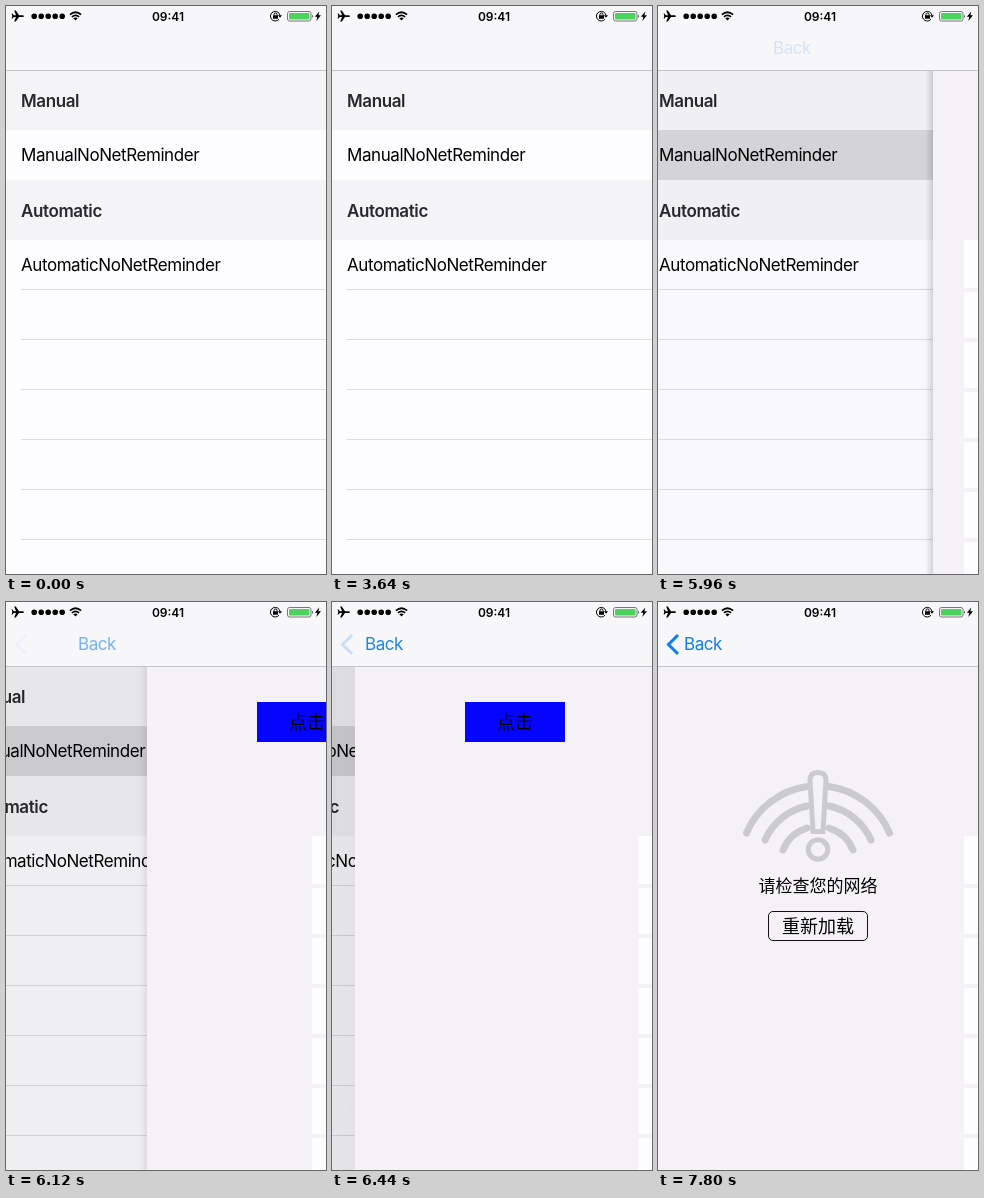
An HTML page for the animation above (8 s loop, 320 by 568 pixels).

```html
<!DOCTYPE html>
<html lang="zh-CN">
<head>
<meta charset="utf-8">
<style>
  html, body { margin: 0; width: 100%; height: 100%; overflow: hidden; }
  svg { display: block; width: 320px; height: 568px; }
  text { font: 17px Inter, sans-serif; letter-spacing: -.43px; }
  .head { font-weight: 600; fill: #29292c; letter-spacing: -.38px; }
  .time { font-size: 12px; font-weight: 600; letter-spacing: 0; }
  .cjk { font: 18px "Noto Sans CJK SC", "Noto Sans CJK", sans-serif; letter-spacing: 0; text-anchor: middle; }
  .line { fill: none; stroke-linecap: round; }
</style>
</head>
<body>
<svg viewBox="0 0 320 568">
  <defs>
    <linearGradient id="fade">
      <stop offset="0" stop-opacity="0"/>
      <stop offset="1" stop-opacity=".17"/>
    </linearGradient>
  </defs>

  <g id="list">
    <rect width="320" height="568" fill="#fdfcff"/>
    <path d="M0 64h320v60H0zM0 174h320v60H0z" fill="#f4f3f6"/>
    <rect id="pressed" y="124" width="320" height="50" fill="#d7d6d9"/>
    <path d="M15 283.5H320M15 333.5H320M15 383.5H320M15 433.5H320M15 483.5H320M15 533.5H320" stroke="#dddce0"/>
    <text class="head" x="15" y="101">Manual</text>
    <text x="15" y="155">ManualNoNetReminder</text>
    <text class="head" x="15" y="211">Automatic</text>
    <text x="15" y="265">AutomaticNoNetReminder</text>
  </g>
  <rect id="dim" width="320" height="568"/>

  <g id="detail">
    <rect id="shadow" x="-8" width="8" height="568" fill="url(#fade)"/>
    <rect width="320" height="568" fill="#f4f2f6"/>
    <g id="button">
      <rect x="110" y="100" width="100" height="40" fill="#0505ff"/>
      <text class="cjk" x="160" y="127">点击</text>
    </g>
  </g>
  <path id="strips" d="M306 234h14v48h-14zM306 286h14v46h-14zM306 336h14v46h-14zM306 386h14v46h-14zM306 436h14v46h-14zM306 486h14v46h-14zM306 536h14v32h-14z" fill="#fdfcff"/>

  <g id="offline">
    <g class="line" stroke="#cbcacd">
      <path stroke-width="7" d="M88.5 231A78 78 0 0 1 149 184.5M171 184.5A78 78 0 0 1 231.5 231M107 238A59 59 0 0 1 149 204M171 204A59 59 0 0 1 213 238M125 248A38 38 0 0 1 149 226M171 226A38 38 0 0 1 195 248"/>
      <path stroke-width="5" fill="#f4f2f6" d="M152 178Q152 170.5 160 170.5Q168 170.5 168 178L165 229.5H155Z"/>
      <circle cx="160" cy="247.5" r="9.7" stroke-width="5"/>
    </g>
    <text class="cjk" x="160" y="290" style="font-size:17px">请检查您的网络</text>
    <rect x="110.5" y="309.5" width="99" height="29" rx="4.5" fill="none" stroke="#111"/>
    <text class="cjk" x="160" y="330.5">重新加载</text>
  </g>

  <rect width="320" height="64" fill="#f7f6f9"/>
  <rect y="64" width="320" height="1" fill="#c4c3c7"/>
  <path id="chevron" d="M20 33L10.5 42.5L20 52" fill="none" stroke="#0b7ef0" stroke-width="3"/>
  <text id="back" x="26" y="48" fill="#0b7ef0">Back</text>

  <path d="M6 9.2h4L8.2 4.6h1.6L13 9.2h4q2 .9 0 1.8h-4l-3.2 4.6H8.2L10 11H7.8l-1.3 1.6H5.6L6.3 10.1L5.6 7.6h.9L7.8 9.2z"/>
  <path class="line" d="M28.2 10.3h0m7 0h0m7 0h0m7 0h0m7 0h0" stroke="#000" stroke-width="5.6"/>
  <path fill="none" stroke="#000" stroke-width="1.7" d="M63.9 8.6Q69.5 3.9 75.1 8.6M65.9 10.8Q69.5 7.9 73.1 10.8"/>
  <path d="M67.3 12.2Q69.5 10.6 71.7 12.2L69.5 14.5z"/>
  <text class="time" x="162" y="14.5" text-anchor="middle">09:41</text>
  <path fill="none" stroke="#000" d="M273 13.2A4.8 4.8 0 1 1 274 9.5M268 9.5V8.5a1.5 1.5 0 0 1 3 0v1"/>
  <path d="M267 9.3h5v3.5h-5zM272 9.3h4l-2 2.5z"/>
  <rect x="281.5" y="5.5" width="23.5" height="9.5" rx="2" fill="none" stroke="#777"/>
  <rect x="283" y="7" width="20.5" height="6.5" rx="1" fill="#4cd35f"/>
  <path d="M306 8.5q1.5 1.7 0 3.5z"/>
  <path d="M313.3 5.5l-4.5 5.2h2.5l-1 4.3 4.7-5.7h-2.6z"/>
</svg>
<script>
  const LOOP = 8000, STEP = 40, WIDTH = 320;
  const PRESS = 5640, PUSH = 5873.5, OFFLINE = 7480;
  const el = id => document.getElementById(id);
  const move = (id, x) => el(id).setAttribute('transform', `translate(${Math.round(x)})`);
  const alpha = (id, value) => el(id).setAttribute('opacity', value);

  // Critically damped spring: 1 at the start, settling to 0.
  const spring = time => {
    const u = Math.max(0, time) * 0.0076;
    return (1 + u) * Math.exp(-u);
  };

  function draw(now) {
    const t = Math.floor(now % LOOP / STEP) * STEP;
    const pushed = t >= PUSH;
    const left = spring(t - PUSH);
    const done = 1 - left;

    alpha('pressed', +(t >= PRESS));
    move('list', -0.3 * WIDTH * done);
    alpha('dim', 0.1 * done);
    move('detail', pushed ? WIDTH * left : WIDTH + 10);
    alpha('shadow', left);
    alpha('strips', +pushed);
    alpha('button', +(t < OFFLINE));
    alpha('offline', +(t >= OFFLINE));
    move('back', 0.325 * WIDTH * left);
    alpha('back', done);
    alpha('chevron', 0.08 * done + 0.92 * done ** 28);
  }

  const start = performance.now();
  (function tick() {
    draw(performance.now() - start);
    requestAnimationFrame(tick);
  })();
</script>
</body>
</html>
```
